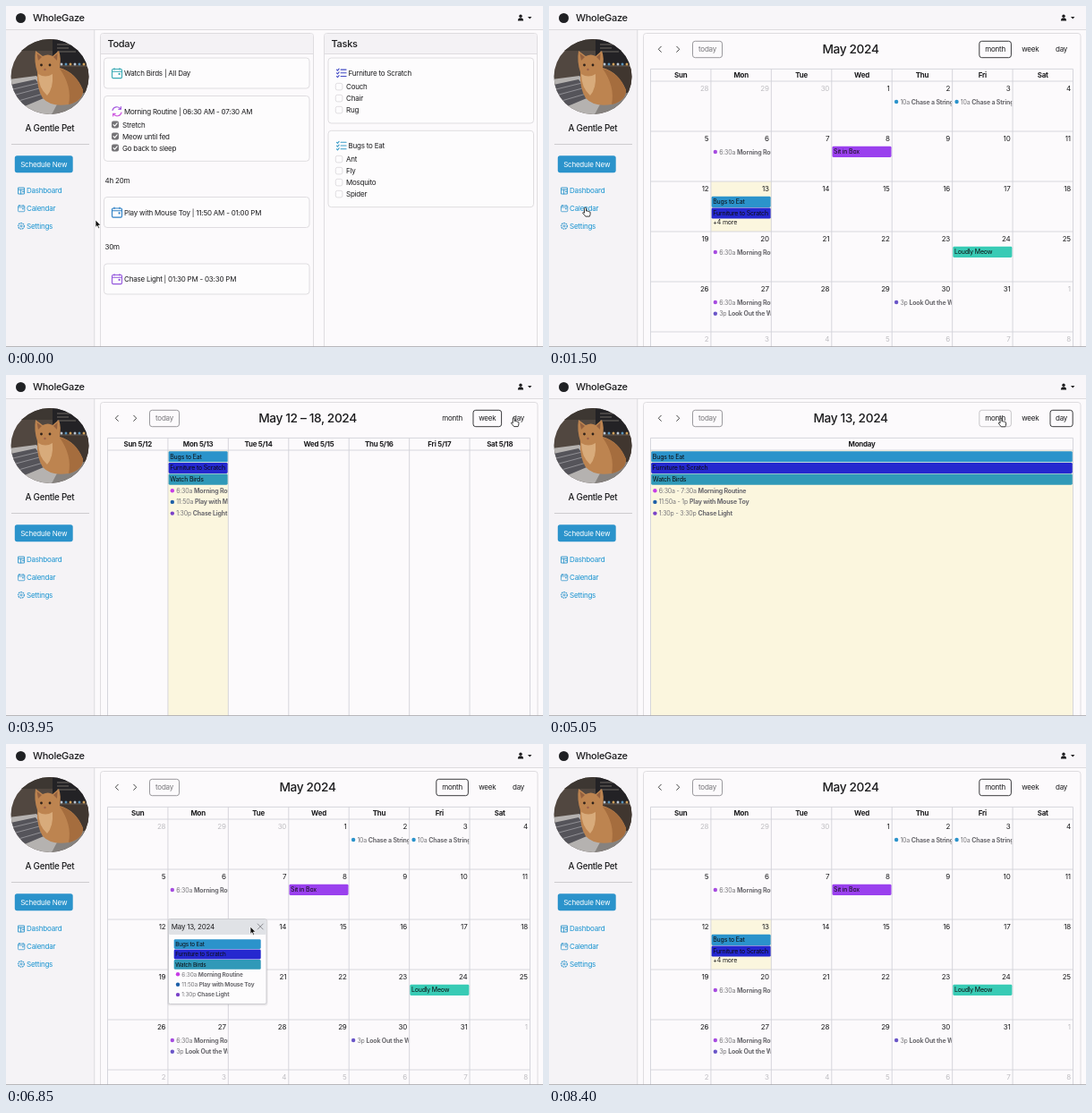
Animation, 600 px wide and 381 px high, one loop 8.45 s. Source, as an HTML page:

```html
<!DOCTYPE html>
<html lang="en">
<head>
<meta charset="utf-8">
<title>Calendar tour</title>
<style>
html, body { margin: 0; width: 100%; height: 100%; overflow: hidden; background: #fcfafc; }
svg { display: block; width: 600px; height: 381px; }
text { font-family: Inter, "Liberation Sans", sans-serif; letter-spacing: -.027em; white-space: pre; }
</style>
</head>
<body>
<svg id="stage" viewBox="0 0 600 381" xmlns="http://www.w3.org/2000/svg"></svg>
<script>
const LOOP = 8450;
const BLUE = '#2b93cb', INK = '#1b1b1d', LINE = '#dcdadd', GRID = '#d2d2d8', TODAY = '#fbf6de';
const LEFT = 113.5, TOP = 84, COL = 67.43, ROW = 56, STEP = 12.7;
const hot = { all: [], dash: [], month: [], week: [], day: [], popup: [] };

// ---- drawing helpers
const rect = (x, y, w, h, fill, stroke = 'none', r = 0) =>
  `<rect x="${x}" y="${y}" width="${w}" height="${h}" rx="${r}" fill="${fill}" stroke="${stroke}" stroke-width=".9"/>`;
const line = (d, stroke, w = 1) =>
  `<path d="${d}" fill="none" stroke="${stroke}" stroke-width="${w}" stroke-linecap="round" stroke-linejoin="round"/>`;
const rule = (d, stroke = GRID) => `<path d="${d}" fill="none" stroke="${stroke}" stroke-width=".9"/>`;
const dot = (x, y, fill, r = 2.2) => `<circle cx="${x}" cy="${y}" r="${r}" fill="${fill}"/>`;
const shape = (d, fill) => `<path d="${d}" fill="${fill}"/>`;
const text = (s, x, y, o = {}) =>
  `<text x="${x}" y="${y}" font-size="${o.size || 8}" font-weight="${o.weight || 400}" fill="${o.fill || INK}" text-anchor="${o.anchor || 'start'}">${s}</text>`;
const mid = (s, x, y, o = {}) => text(s, x, y, { ...o, anchor: 'middle' });
const group = (id, body) => `<g id="${id}">${body}</g>`;
const zone = (view, x, y, w, h, extra) => hot[view].push({ x, y, w, h, ...extra });

let clips = 0;
const clipped = (x, y, w, h, body) => {
  const id = 'clip' + clips++;
  return `<clipPath id="${id}"><rect x="${x}" y="${y}" width="${w}" height="${h}"/></clipPath><g clip-path="url(#${id})">${body}</g>`;
};

function calIcon(x, y, color, s = 1) {
  return `<g transform="translate(${x} ${y}) scale(${s})">` +
    line('M1.8 1.2H10.2Q11.5 1.2 11.5 2.5V10Q11.5 11.3 10.2 11.3H1.8Q.5 11.3 .5 10V2.5Q.5 1.2 1.8 1.2ZM.5 4H11.5M3 .2V1.6M9 .2V1.6', color, 1.1) +
    rect(7.6, 5.6, 2, 2, color) + '</g>';
}
function listIcon(x, y, color) {
  return line([0, 3.7, 7.4].map(k => `M${x} ${y + k + .6}l1 1 1.6-2M${x + 4.6} ${y + k + .5}h6`).join(''), color, 1.1);
}
function checkbox(x, y, on) {
  return on
    ? rect(x, y, 8, 8, '#757477', 'none', 2) + line(`M${x + 2} ${y + 4.2}l1.5 1.5 2.7-3.3`, '#fff', 1.1)
    : rect(x + .3, y + .3, 7.6, 7.6, '#fdfcfd', '#dddbde', 2);
}

// ---- shared frame: navigation bar and sidebar
function photo() {
  return `<clipPath id="face"><ellipse cx="49" cy="79" rx="43.5" ry="42"/></clipPath><g clip-path="url(#face)">` +
    rect(4, 36, 90, 87, '#514740') +
    rect(52, 36, 44, 30, '#232225') +
    rect(4, 36, 48, 14, '#3d3732') +
    rule('M57 43H76M57 47H70M57 51H78', '#77706a') +
    [62, 67, 72, 77, 82, 87].map((x, i) => dot(x, 65, ['#b8c4d0', '#5b93b8', '#d0a05a'][i % 3], 1.5)).join('') +
    shape('M58 68H94V100H58Z', '#40362f') +
    shape('M54 102L94 96V123H48Z', '#86827f') +
    shape('M4 82L34 78L58 108L50 123H4Z', '#b5b2b0') +
    shape('M5 88L33 82L47 101L16 114Z', '#55545a') +
    rule('M8 93L37 86M11 99L41 91M14 106L45 97', '#98979b') +
    shape('M35 74Q31 62 33 50L41 56Q47 53 52 56L59 50Q62 58 60 69Q78 74 86 94Q86 106 70 110Q50 113 41 103Q34 92 35 74Z', '#bd8450') +
    shape('M60 70Q78 74 86 94Q86 106 70 110Q74 90 60 70Z', '#a56d3e') +
    shape('M36 76Q44 81 52 76Q53 92 46 100Q36 91 36 76Z', '#d8ab7b') +
    shape('M34.5 53L40 57L36 61ZM57.5 53L53 57L57 61Z', '#94613f') +
    dot(39.5, 66, '#302219', 1.4) + dot(49, 66, '#302219', 1.4) + dot(43.5, 71, '#9a604a', 1.2) + '</g>';
}

function shell() {
  const links = ['Dashboard', 'Calendar', 'Settings'].map((s, i) => {
    const y = 209.3 + i * 19.8;
    zone('all', 12, y - 9, 50, 12);
    return text(s, 23, y, { fill: '#1592d0' });
  }).join('');
  zone('all', 10, 167, 65, 19);
  return rect(0, 0, 600, 381, '#fcfafc') +
    rect(0, 26, 99, 355, '#f5f3f6') +
    rect(0, 0, 600, 26, '#f8f6f9') +
    rule('M0 26.5H600M98.8 26.5V381', '#dbd9dc') +
    dot(16.5, 13.5, '#202124', 5.5) +
    text('WholeGaze', 30, 17, { size: 11, weight: 500 }) +
    dot(575, 11.2, INK, 1.7) + shape('M571.9 16.5Q572 13.3 575 13.3Q578 13.3 578.1 16.5Z', INK) +
    shape('M583 12H587.4L585.2 14.4Z', INK) +
    photo() +
    mid('A Gentle Pet', 49, 140, { size: 9.8, weight: 500 }) +
    rule('M6 154.5H93', '#c9c7ca') +
    rect(9.8, 167.2, 64.9, 19, BLUE, 'none', 2.6) +
    mid('Schedule New', 42.2, 179.7, { fill: '#fff' }) +
    line('M14 203H20.4V210H14ZM14 205.2H20.4M16.6 205.2V210M18.4 207.4H20.4', BLUE, .9) +
    calIcon(13.2, 222.3, BLUE, .66) +
    `<circle cx="17" cy="245.8" r="3.3" fill="none" stroke="${BLUE}" stroke-width="1.2" stroke-dasharray="1.7 .7"/>` +
    `<circle cx="17" cy="245.8" r="1.1" fill="none" stroke="${BLUE}" stroke-width=".8"/>` + links;
}

// ---- dashboard
function panel(x, title) {
  return rect(x, 30.5, 238, 360, '#fcfafc', LINE, 3) +
    shape(`M${x + .5} 53V33.5Q${x + .5} 31 ${x + 3} 31H${x + 235}Q${x + 237.5} 31 ${x + 237.5} 33.5V53Z`, '#f4f2f5') +
    rule(`M${x} 53.5H${x + 238}`, LINE) +
    text(title, x + 8, 46, { size: 11, weight: 500 });
}
const card = (x, y, h) => rect(x, y, 229.5, h, '#fdfcfd', LINE, 3.5);
const checks = (x, y, on, names) => names.map((s, i) =>
  checkbox(x, y - 7 + i * 13, on) + text(s, x + 12, y + i * 13)).join('');

function dashboard() {
  const slot = (y, s, color) => card(109.5, y, 34) + calIcon(118, y + 11.3, color) + text(s, 132, y + 20.3);
  return panel(105.5, 'Today') + panel(355.5, 'Tasks') +
    slot(58, 'Watch Birds | All Day', '#38a9b4') +
    card(109.5, 100.5, 72.8) +
    line('M119 116.5A5 5 0 0 1 128 115M128.4 112.6V115.3H125.8', '#a55be0', 1.2) +
    line('M129 119A5 5 0 0 1 120 120.6M119.6 123V120.3H122.2', '#cf5be0', 1.2) +
    text('Morning Routine | 06:30 AM - 07:30 AM', 132, 121) +
    checks(118, 135.5, true, ['Stretch', 'Meow until fed', 'Go back to sleep']) +
    text('4h 20m', 110.5, 198.2) +
    slot(213.5, 'Play with Mouse Toy | 11:50 AM - 01:00 PM', '#2b7fc4') +
    text('30m', 110.5, 272.2) +
    slot(288, 'Chase Light | 01:30 PM - 03:30 PM', '#9355dc') +
    card(360, 58, 73) + listIcon(369.5, 70.6, '#4048c4') + text('Furniture to Scratch', 382.5, 78.3) +
    checks(368, 93, false, ['Couch', 'Chair', 'Rug']) +
    card(360, 139.3, 85.4) + listIcon(369.5, 151.8, '#3a9cc8') + text('Bugs to Eat', 382.5, 159.4) +
    checks(368, 174, false, ['Ant', 'Fly', 'Mosquito', 'Spider']);
}

// ---- calendar views
const BUTTONS = { month: [480.8, 35.6], week: [522, 31.6], day: [560, 25.2] };
const outline = (name, stroke, id = '') => {
  const [x, w] = BUTTONS[name];
  return `<rect ${id} x="${x}" y="39.3" width="${w}" height="18.4" rx="2.8" fill="none" stroke="${stroke}" stroke-width="1"/>`;
};

function toolbar(view, title) {
  return rect(105.5, 30.5, 488.5, 360, '#fcfafc', LINE, 3) +
    line('M125.3 45.2L122.3 48.3L125.3 51.4M142.7 45.2L145.7 48.3L142.7 51.4', '#333', .9) +
    rect(160.5, 39.3, 33, 18.4, 'none', '#8f8e92', 2.8) +
    mid('today', 177, 51.2, { fill: '#77767a' }) +
    mid(title, 337, 53.2, { size: 13.7, weight: 500 }) +
    outline(view, '#3a3a3d') +
    Object.entries(BUTTONS).map(([s, [x, w]]) => mid(s, x + w / 2, 51.2)).join('');
}

function bar(view, x, y, w, s, color, h = 12.1, size = 7) {
  zone(view, x, y, w, h);
  return rect(x, y, w, h, color, 'none', 1.4) +
    clipped(x, y, w, h, text(s, x + 1.6, y + h / 2 + size * .36, { size, fill: '#0c0c10' }));
}
function timed(view, x, y, w, time, s, color, size = 7) {
  zone(view, x, y - 5, w, 10);
  return dot(x + 4.3, y, color) +
    clipped(x, y - 6, w, 12, `<text x="${x + 8.6}" y="${y + size * .36}" font-size="${size}" fill="#77767a">${time} <tspan font-weight="700" fill="#6a696e">${s}</tspan></text>`);
}

const colX = c => LEFT + c * COL;
const ALLDAY = [['Bugs to Eat', BLUE], ['Furniture to Scratch', '#2528cf'], ['Watch Birds', '#3099b8']];
const SLOTS = [['6:30a', '7:30a', 'Morning Routine', '#c73ce6'], ['11:50a', '1p', 'Play with Mouse Toy', '#1d5fa8'], ['1:30p', '3:30p', 'Chase Light', '#7a42c8']];
const WEEKDAYS = ['Sun', 'Mon', 'Tue', 'Wed', 'Thu', 'Fri', 'Sat'];

function grid(labels, rows) {
  let d = `M${LEFT} 381V70.4H585.5V381M${LEFT} ${TOP}H585.5`;
  const w = 472 / labels.length;
  for (let c = 1; c < labels.length; c++) d += `M${LEFT + c * w} 70.4V381`;
  for (let r = 1; r < rows; r++) d += `M${LEFT} ${TOP + r * ROW}H585.5`;
  return rule(d) + labels.map((s, i) => mid(s, LEFT + (i + .5) * w, 80.2, { weight: 700, size: 7.9 })).join('');
}

function month() {
  let out = toolbar('month', 'May 2024') + rect(colX(1), TOP + 2 * ROW, COL, ROW, TODAY) + grid(WEEKDAYS, 6);
  for (let i = 0; i < 42; i++) {
    const n = i < 3 ? 28 + i : (i - 3) % 31 + 1, other = i < 3 || i > 33;
    const x = colX(i % 7 + 1), y = TOP + Math.floor(i / 7) * ROW;
    out += text(n, x - 2.6, y + 11, { anchor: 'end', fill: other ? '#bfbec2' : INK });
    zone('month', x - 13, y + 1, 13, 14, { under: n > 9 ? 9 : 5 });
  }
  const solid = (r, c, k, s, color) => bar('month', colX(c) + .7, TOP + r * ROW + 16.8 + k * STEP, COL - 1.4, s, color);
  const item = (r, c, k, time, s, color) => timed('month', colX(c) + .6, TOP + r * ROW + 23 + k * STEP, COL - 1.4, time, s, color);
  const wake = r => item(r, 1, 0, '6:30a', 'Morning Routine', '#a64be0');
  const look = (c, k) => item(4, c, k, '3p', 'Look Out the Window', '#6a55c8');
  const chase = c => item(0, c, 0, '10a', 'Chase a String', BLUE);
  zone('month', 182, 238, 30, 9);
  return out + chase(4) + chase(5) + wake(1) + solid(1, 3, 0, 'Sit in Box', '#9a40ee') +
    ALLDAY.slice(0, 2).map(([s, color], k) => solid(2, 1, k, s, color)).join('') +
    text('+4 more', colX(1) + 2.4, 244.4, { size: 7 }) +
    wake(3) + solid(3, 5, 0, 'Loudly Meow', '#38cbb5') + wake(4) + look(1, 1) + look(4, 0);
}

function agenda(view, x, w, range) {
  return ALLDAY.map(([s, color], k) => bar(view, x + .7, 85.2 + k * STEP, w - 1.4, s, color)).join('') +
    SLOTS.map(([a, b, s, color], k) =>
      timed(view, x + .6, 129.2 + k * STEP, w - 1.4, range ? `${a} - ${b}` : a, s, color)).join('');
}
const week = () => toolbar('week', 'May 12 – 18, 2024') + rect(colX(1), TOP, COL, 300, TODAY) +
  grid(WEEKDAYS.map((s, i) => `${s} 5/${12 + i}`), 1) + agenda('week', colX(1), COL, false);
const day = () => toolbar('day', 'May 13, 2024') + rect(LEFT, TOP, 472, 300, TODAY) +
  grid(['Monday'], 1) + agenda('day', LEFT, 472, true);

function popup() {
  zone('popup', 279, 199, 10, 10);
  return rect(180.5, 195.5, 112, 97, 'rgba(0,0,0,.07)', 'none', 3) +
    rect(181.5, 195.5, 109.5, 95, '#fdfcfd', '#c8c8cc', 2) +
    rect(182, 196, 108.5, 17, '#e0e2e6', 'none', 1.5) +
    text('May 13, 2024', 184.8, 207.3) +
    line('M281.2 201L287.2 207M287.2 201L281.2 207', '#77777c', .8) +
    ALLDAY.map(([s, color], k) => bar('popup', 187.7, 218.2 + k * 11.4, 97, s, color, 10.8, 6.4)).join('') +
    SLOTS.map(([a, , s, color], k) => timed('popup', 187.7, 257.3 + k * 11.4, 97, a, s, color, 6.5)).join('');
}

const ARROW = '<path id="arrow" d="M0 0V8.3L1.9 6.6L3.2 9.4L4.5 8.8L3.3 6.1H5.9Z" fill="#111" stroke="#fff" stroke-width=".7"/>';
const HAND = '<path id="hand" d="M-1 .9Q-1 -.2 0 -.2Q1 -.2 1 .9V3.6Q2 3 2.6 3.9Q3.6 3.4 4.2 4.3Q5.6 4 5.6 5.4V6.8Q5.6 8.2 4.8 9.6H.3Q-.9 8 -2.6 6.1Q-3 5.2 -2.2 5Q-1.6 4.9 -1 5.7Z" fill="#fff" stroke="#161616" stroke-width=".85" stroke-linejoin="round"/>';

const stage = document.getElementById('stage');
stage.innerHTML = shell() + group('dash', dashboard()) + group('month', month()) + group('week', week()) +
  group('day', day()) + group('popup', popup()) +
  outline('month', '#3a3a3d', 'id="press"') + '<path id="under" stroke="#1b1b1d" stroke-width=".7"/>' +
  rule('M0 380.6H600', '#aaa9ad') + group('cursor', ARROW + HAND);
const $ = id => document.getElementById(id);

// ---- timeline
const VIEWS = [[0, 'dash'], [1250, 'month'], [3450, 'week'], [4150, 'day'], [5150, 'month']];
const POPUP = [6250, 7150];
const PATH = [
  [0, 100, 239], [500, 100, 239], [1050, 40.5, 225.5], [2150, 40.5, 225.5], [2600, 180, 209.5],
  [2800, 196, 205], [3250, 538, 48], [3500, 538, 48], [3800, 567.3, 48], [4450, 567.3, 48],
  [4850, 505, 48.2], [5400, 505, 48.2], [6050, 197, 242], [6400, 197, 242], [6850, 273, 204],
  [7000, 284, 204], [7250, 284, 204], [7800, 606, 150], [LOOP, 606, 150]
];

function cursorAt(t) {
  const i = Math.max(1, PATH.findIndex(p => p[0] > t));
  const [t0, x0, y0] = PATH[i - 1], [t1, x1, y1] = PATH[i];
  const u = (t - t0) / (t1 - t0), e = u * u * (3 - 2 * u);
  return [x0 + (x1 - x0) * e, y0 + (y1 - y0) * e];
}
const show = (id, on) => $(id).setAttribute('visibility', on ? 'visible' : 'hidden');

function draw(t) {
  const [, view] = VIEWS.filter(v => v[0] <= t).pop();
  const open = t >= POPUP[0] && t < POPUP[1];
  for (const v of ['dash', 'month', 'week', 'day']) show(v, v === view);
  show('popup', open);

  // outline fades in on a view button just before its view opens
  const next = VIEWS.slice(2).find(v => t < v[0] && t >= v[0] - 150);
  show('press', !!next);
  if (next) {
    const [x, w] = BUTTONS[next[1]];
    $('press').setAttribute('x', x);
    $('press').setAttribute('width', w);
    $('press').setAttribute('opacity', (t - next[0] + 150) / 200);
  }

  const [x, y] = cursorAt(t);
  const covered = open && x > 181 && x < 291 && y > 195 && y < 291;
  const zones = covered ? hot.popup : hot.all.concat(hot[view]);
  const hit = zones.find(z => x >= z.x && x <= z.x + z.w && y >= z.y && y <= z.y + z.h);
  const onBar = view !== 'dash' && y > 39 && y < 58 && (x > 480 && x < 586 || x > 117 && x < 194);
  const link = !!hit || onBar;
  show('arrow', !link);
  show('hand', link);
  $('cursor').setAttribute('transform', `translate(${x.toFixed(2)} ${y.toFixed(2)})`);

  const under = hit && hit.under;
  show('under', !!under);
  if (under) $('under').setAttribute('d', `M${hit.x + 10.4 - under} ${hit.y + 11.5}h${under}`);
}

const start = performance.now();
function tick() {
  draw((performance.now() - start) % LOOP);
  requestAnimationFrame(tick);
}
tick();
</script>
</body>
</html>
```
